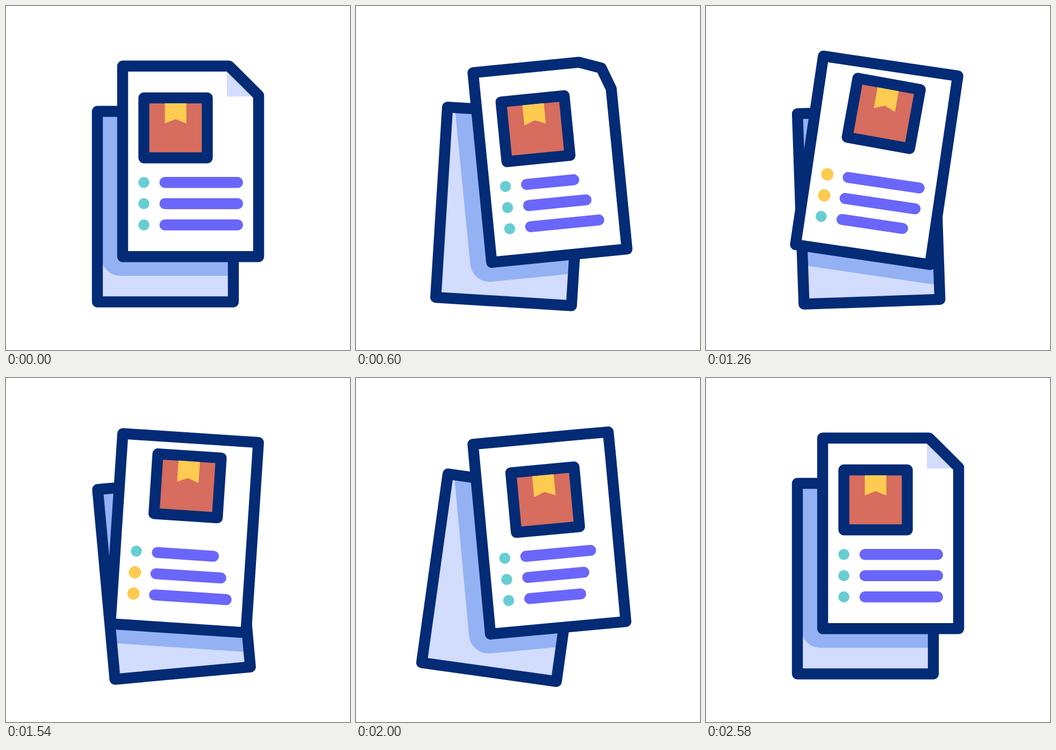
Write an HTML page that moves like this. It is 640 px wide and 640 px high and loops after 3 s.

```html
<!DOCTYPE html>
<html lang="en">
<head>
<meta charset="utf-8">
<title>Documents</title>
<style>
  html, body { margin: 0; width: 100%; height: 100%; overflow: hidden; background: #fff; }
  svg { display: block; width: 100vw; height: 100vh; }
  .ink { stroke: #032b76; stroke-width: 20.4; stroke-linejoin: round; }
  .rule { stroke: #6a66f9; stroke-width: 20.4; stroke-linecap: round; }
</style>
</head>
<body>
<svg viewBox="0 0 640 640">
  <defs>
    <clipPath id="backClip">
      <rect id="backHole" x="170" y="196" width="253" height="354.5"/>
    </clipPath>
  </defs>
  <rect id="backFill" x="170" y="196" width="253" height="354.5" fill="#d2dcfd"/>
  <g clip-path="url(#backClip)">
    <rect id="shade" x="177" y="70" width="334" height="432" rx="36" fill="#94b1f3"/>
  </g>
  <rect id="backLine" class="ink" x="170" y="196" width="253" height="354.5" fill="none"/>
  <g id="front">
    <path id="sheet" fill="#fff"/>
    <path id="flap" fill="#d2dcfd"/>
    <path id="edge" class="ink" fill="none"/>
    <g id="parcel">
      <rect class="ink" x="256.5" y="171" width="118" height="111.5" fill="#d66d5e"/>
      <path id="ribbon" fill="#fdcb50"/>
    </g>
    <g id="list"></g>
  </g>
</svg>
<script>
const LOOP = 3000;
const $ = id => document.getElementById(id);
const set = (id, name, value) => $(id).setAttribute(name, value);

// Eased 0 to 1 over a duration.
function ease(t, start, duration) {
  const s = Math.min(1, Math.max(0, (t - start) / duration));
  return s * s * (3 - 2 * s);
}

// Starts at 0 and visits each value in turn, one per step.
const swing = (t, start, step, ...values) => values.reduce(
  (sum, value, i) => sum + (value - (values[i - 1] || 0)) * ease(t, start + i * step, step), 0);

// Rises from 0 to 1, holds, and falls back, ending at the given time.
const pulse = (t, start, end, duration) =>
  ease(t, start, duration) - ease(t, end - duration, duration);

function add(tag, attrs) {
  const el = document.createElementNS("http://www.w3.org/2000/svg", tag);
  for (const k in attrs) el.setAttribute(k, attrs[k]);
  return $("list").appendChild(el);
}

const rows = [0, 1, 2].map(i => {
  const y = 328.3 + 39.5 * i;
  return {
    dot: add("circle", { cx: 256.5, cy: y }),
    rule: add("line", { class: "rule", x1: 295.7, y1: y, y2: y })
  };
});

const teal = [104, 205, 210], yellow = [253, 203, 80];
const mix = k => `rgb(${teal.map((c, i) => Math.round(c + (yellow[i] - c) * k))})`;

function drawPages(t) {
  const frontTurn = `rotate(${swing(t, 200, 560, -7, 8.9, -6, 0)} 343.5 111.7)`;
  const backTurn = `rotate(${swing(t, 340, 560, 7.9, -6, 8, 0)} 296.5 196)`;
  for (const id of ["front", "shade"]) set(id, "transform", frontTurn);
  for (const id of ["backFill", "backLine", "backHole"]) set(id, "transform", backTurn);
}

function drawCorner(t) {
  const c = 27.4 * pulse(t, 410, 2380, 400);
  const outline = `M217 111.7H415L${442.5 + c} ${139.1 - c}L470 166.5V466.3H217Z`;
  set("sheet", "d", outline);
  set("edge", "d", outline);

  const f = 1 - pulse(t, 200, 2580, 200);
  set("flap", "d", `M${415 - 4 * f} 111.7L${442.5 - 31.5 * f} ${139.1 + 29.3 * f}L470 ${166.5 + 1.8 * f}Z`);
  set("flap", "visibility", f > 0 ? "visible" : "hidden");
}

function drawParcel(t) {
  const aside = pulse(t, 470, 2330, 400);
  const lift = pulse(t, 800, 2000, 300);
  const turn = swing(t, 660, 280, -2.7, 2, 0);
  set("parcel", "transform",
    `translate(${28.2 * aside} ${-26 * lift}) rotate(${turn} 315.5 226.7)`);
  const tip = 218.5 + 1.8 * aside;
  set("ribbon", "d", `M295.5 181H335.5V${tip}L315.5 ${tip - 8}L295.5 ${tip}Z`);
}

function drawList(t) {
  rows.forEach(({ dot, rule }, i) => {
    const glow = pulse(t - 260 * i, 800, 1400, 80);
    dot.setAttribute("r", 10.3 + 1.2 * glow);
    dot.setAttribute("fill", mix(glow));
    rule.setAttribute("x2", 430.8 - swing(t - 140 * i, 200, 500, 52, 0, 40, 0));
  });
}

const start = performance.now();
function tick() {
  const t = (performance.now() - start) % LOOP;
  drawPages(t);
  drawCorner(t);
  drawParcel(t);
  drawList(t);
  requestAnimationFrame(tick);
}
tick();
</script>
</body>
</html>
```
